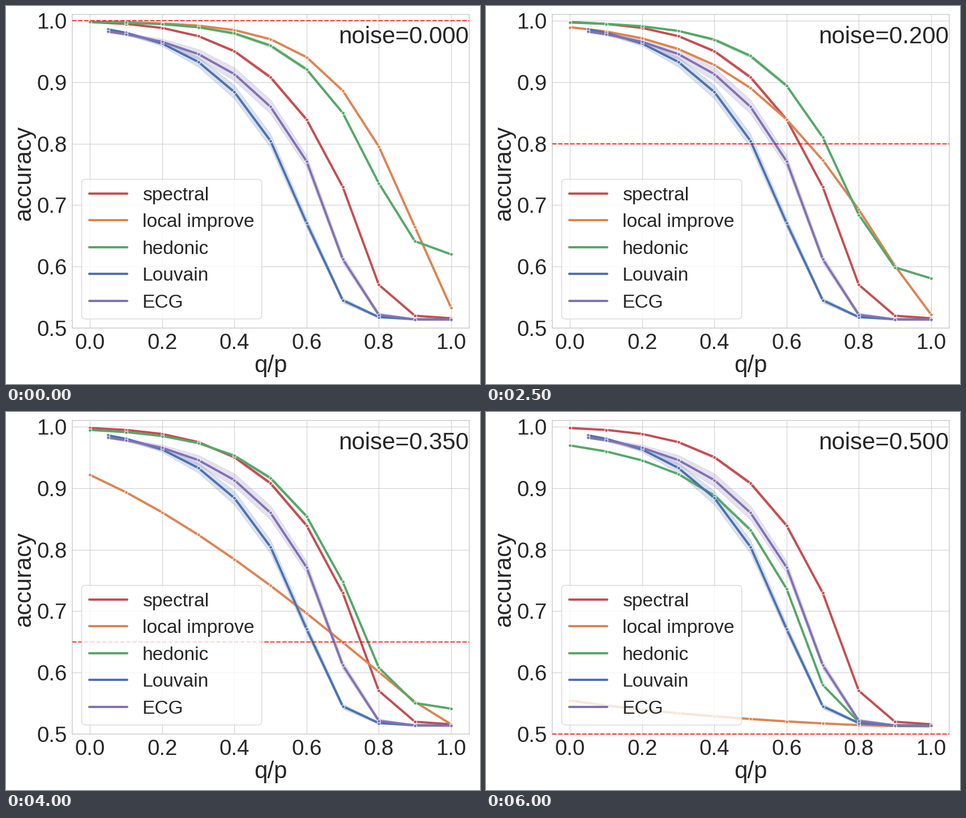
A matplotlib script that plays this animation: 837 px wide and 669 px high, repeating every 6500 ms.

```python
import math

import numpy as np
import matplotlib.pyplot as plt
from matplotlib.animation import FuncAnimation
from matplotlib.lines import Line2D
from matplotlib.patches import FancyBboxPatch

W, H = 837, 669
LEFT, RIGHT, TOP, BOTTOM = 116.6, 817.6, 15.4, 569.8
INK = "#262626"
RED, ORANGE, GREEN = "#C44E52", "#DD8452", "#55A868"
BLUE, PURPLE = "#4C72B0", "#8172B3"

plt.rcParams["font.family"] = "Liberation Sans"
plt.rcParams["text.color"] = INK

# Steps of 0.05, with a half step after the start and before the end.
NOISE = np.r_[0, 0.025, np.arange(1, 10) * 0.05, 0.475, 0.5]
X = np.linspace(0, 1, 11)
X_COMMUNITY = np.r_[0.05, X[1:]]

erf = np.vectorize(math.erf)


def accuracy(x, gain, threshold=0, knee=1e-4, bend=0, floor=0.033):
    """Normal CDF of a signal that fades as q/p nears 1.

    The squared signal grows with (1 - q/p)^2 above a soft threshold.
    """
    signal = gain * (1 - x) ** 2 - threshold
    signal = knee * np.logaddexp(0, signal / knee)
    z = np.sqrt(signal / (1 + bend * signal) + floor ** 2)
    return 0.5 + 0.5 * erf(z / math.sqrt(2))


def local_improve(noise):
    s = 1 - 2 * noise
    gain = 17.5 * s ** 2 + 0.01
    bend = (-0.44 + 0.5 * s + 0.89 * s ** 2) / gain
    return accuracy(X, gain, bend=bend, floor=0.03 + 0.053 * s ** 1.5)


def hedonic(noise):
    return accuracy(X, gain=15.3 - 12.5 * noise - 33 * noise ** 4,
                    threshold=0.3 + 1.6 * noise ** 2,
                    knee=0.2 - 0.4 * noise ** 2,
                    bend=0.05 + 0.075 * (2 * noise) ** 14,
                    floor=0.03 + 0.2 * (1 - 2 * noise) ** 1.3)


def bump(x, peak, center, width):
    return peak * np.exp(-((x - center) / width) ** 2)


fig = plt.figure(figsize=(W / 72, H / 72), dpi=72, facecolor="white")
ax = fig.add_axes([LEFT / W, 1 - BOTTOM / H,
                   (RIGHT - LEFT) / W, (BOTTOM - TOP) / H])
ax.set(xlim=(-0.05, 1.05), ylim=(0.5, 1.01),
       xticks=np.arange(6) / 5, yticks=np.arange(5, 11) / 10)
ax.set_axisbelow(True)
ax.grid(color="0.8", lw=1)
ax.tick_params(length=0, pad=9, labelsize=38.5, labelcolor=INK)
ax.xaxis.set_major_formatter("{x:.1f}")
ax.yaxis.set_major_formatter("{x:.1f}")
for spine in ax.spines.values():
    spine.set(color="0.8", lw=1.5)

# Overlay in pixel coordinates, y pointing down.
over = fig.add_axes([0, 0, 1, 1], facecolor="none")
over.set(xlim=(0, W), ylim=(H, 0))
over.axis("off")


class Curve:
    def __init__(self, x, color, band=None):
        self.x, self.band, self.fill = x, band, None
        self.line, = ax.plot(x, np.ones_like(x), color=color, lw=4,
                             marker="o", ms=5.8, mec="white", mew=1,
                             solid_capstyle="round", solid_joinstyle="round")
        if band is not None:
            self.fill = ax.fill_between(x, x, x, color=color, alpha=0.2, lw=1)

    def set(self, y):
        self.line.set_ydata(y)
        if self.fill is not None:
            lower = np.c_[self.x, y - self.band]
            upper = np.c_[self.x, y + self.band]
            self.fill.set_verts([np.concatenate([lower, upper[::-1]])])


thin = bump(X, 0.003, 0.53, 0.25)
spectral_curve = Curve(X, RED, thin)
local_curve = Curve(X, ORANGE)
hedonic_curve = Curve(X, GREEN, thin)
louvain_curve = Curve(X_COMMUNITY, BLUE, bump(X_COMMUNITY, 0.0115, 0.45, 0.25))
ecg_curve = Curve(X_COMMUNITY, PURPLE, bump(X_COMMUNITY, 0.0115, 0.48, 0.3))

# These three do not depend on the noise.
spectral_curve.set(accuracy(X, gain=8.7, threshold=0.41, knee=0.08))
louvain_curve.set(accuracy(X_COMMUNITY, gain=6.3, threshold=0.84, knee=0.12))
ecg_curve.set(accuracy(X_COMMUNITY, gain=7.7, threshold=0.66, knee=0.09,
                       bend=1 / 15))
limit = ax.axhline(1, color="red", ls="--", lw=2, alpha=0.8,
                   zorder=3, clip_on=False)

over.add_patch(FancyBboxPatch(
    (133.6, 306.8), 318, 247, boxstyle="round,pad=0,rounding_size=6.7",
    fc="white", ec="0.8", lw=1.3, alpha=0.8))
LEGEND = [("spectral", RED), ("local improve", ORANGE), ("hedonic", GREEN),
          ("Louvain", BLUE), ("ECG", PURPLE)]
for row, (label, color) in enumerate(LEGEND):
    y = 332 + 47.45 * row
    over.add_line(Line2D([147, 214], [y, y], color=color, lw=4,
                         solid_capstyle="round"))
    over.text(240.6, y + 11.8, label, size=33.5, va="baseline")

over.text(467.1, 648, "q/p", size=42, ha="center", va="baseline")
over.text(42.8, 295.5, "accuracy", size=42, rotation=90,
          rotation_mode="anchor", ha="center", va="baseline")
counter = over.text(817.8, 66, "", size=42, ha="right", va="baseline")


def update(frame):
    noise = NOISE[frame]
    local_curve.set(local_improve(noise))
    hedonic_curve.set(hedonic(noise))
    limit.set_ydata([1 - noise] * 2)
    counter.set_text(f"noise={noise:.3f}")


anim = FuncAnimation(fig, update, frames=len(NOISE), interval=500,
                     init_func=lambda: update(0), repeat=True)
plt.show()
```
